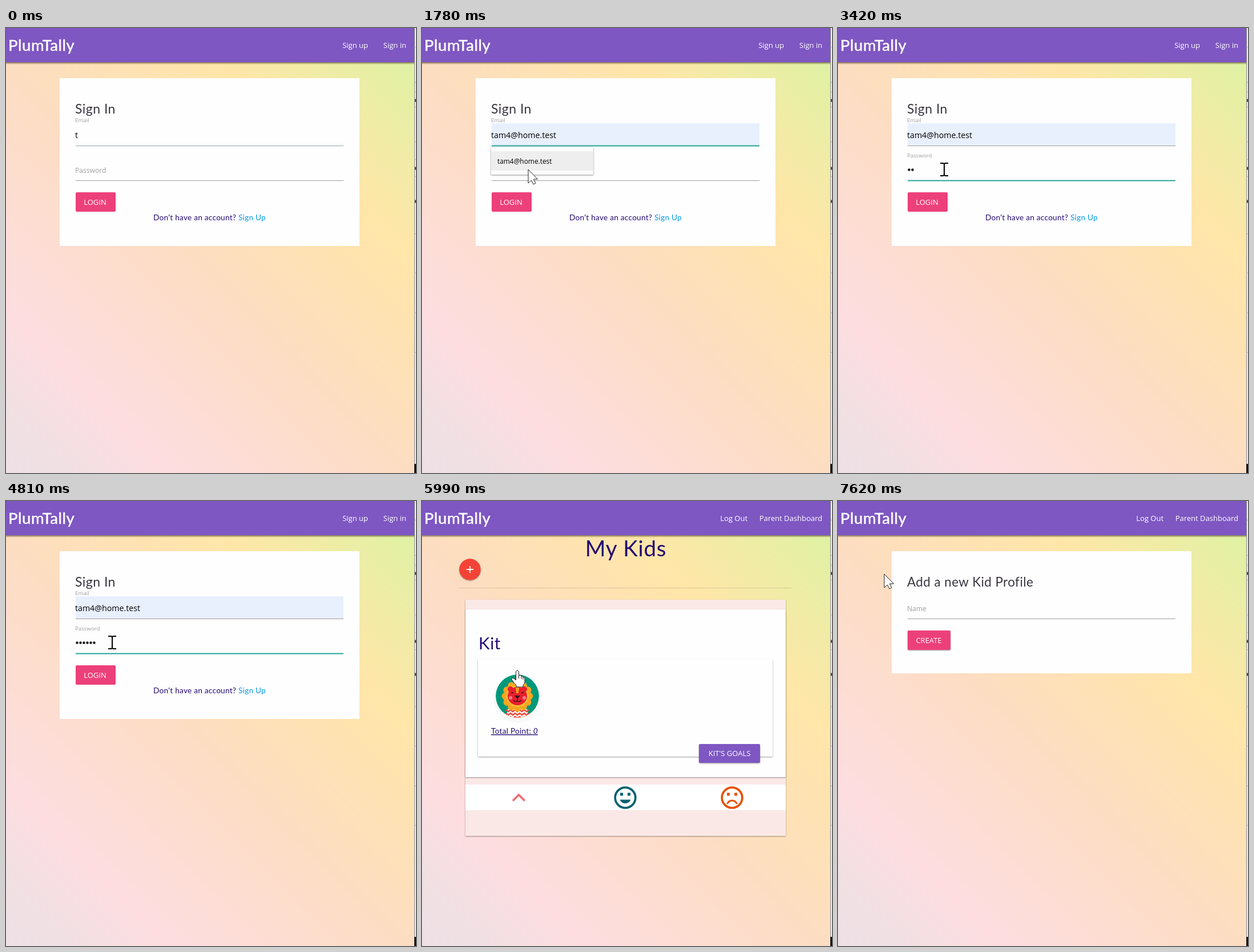
Write an HTML page that moves like this. It is 718x780 px and loops after 8000 ms.

```html
<!DOCTYPE html>
<html lang="en">
<head>
<meta charset="utf-8">
<title>Kid tracker</title>
<style>
  html, body { margin: 0; width: 100%; height: 100%; overflow: hidden; }
  svg { display: block; width: 718px; height: 780px; }
  text { font: 13px "Open Sans", sans-serif; white-space: pre; }
  .hand { font-family: Lato, sans-serif; letter-spacing: .02em; fill: #230a72; }
  .title { font-size: 23px; fill: #3a3640; }
  .white { fill: #fff; }
  .label { font-size: 12.1px; fill: #9e9e9e; }
  .mid { text-anchor: middle; }
  .end { text-anchor: end; }
  .shade { filter: drop-shadow(0 1.5px 1.3px #0006); }
  .icon { fill: none; stroke-width: 3.7; }
</style>
</head>
<body>
<svg viewBox="0 0 718 780">
  <defs>
    <linearGradient id="sky" gradientUnits="userSpaceOnUse" x1="-16" y1="764" x2="732" y2="16">
      <stop offset="0" stop-color="#eee1e6"/>
      <stop offset=".07" stop-color="#f0e0e4"/>
      <stop offset=".19" stop-color="#fddde0"/>
      <stop offset=".47" stop-color="#fdddc2"/>
      <stop offset=".73" stop-color="#ffe6a8"/>
      <stop offset=".96" stop-color="#dff2a4"/>
    </linearGradient>
    <linearGradient id="drop" x2="0" y2="1">
      <stop stop-color="#4a3a1c" stop-opacity=".65"/>
      <stop offset="1" stop-color="#4a3a1c" stop-opacity="0"/>
    </linearGradient>
    <clipPath id="round"><circle cx="167" cy="342" r="38"/></clipPath>
  </defs>

  <rect width="718" height="780" fill="url(#sky)"/>
  <rect y="60" width="715" height="4" fill="url(#drop)"/>
  <rect width="715" height="60" fill="#7e57c2"/>
  <text class="hand" x="4" y="40" style="font-size:27.5px;fill:#fff;stroke:#fff;stroke-width:.5">PlumTally</text>
  <g id="guestNav">
    <text class="white end" x="634" y="35">Sign up</text>
    <text class="white end" x="701" y="35">Sign in</text>
  </g>
  <g id="userNav">
    <text class="white end" x="570" y="35">Log Out</text>
    <text class="white end" x="701" y="35">Parent Dashboard</text>
  </g>

  <g id="signIn">
    <rect x="94" y="88" width="525" height="294" fill="#fefefe"/>
    <text class="hand title" x="121" y="150">Sign In</text>
    <text class="label" x="121" y="165" style="font-size:9.7px">Email</text>
    <rect id="filled" x="122" y="167" width="469" height="39" fill="#e8f0fe"/>
    <text id="email" x="121" y="193" style="font-size:14.2px"></text>
    <rect id="emailLine" x="122" width="469"/>
    <text id="passLabel" class="label" x="121">Password</text>
    <rect id="caret" x="122" y="238" width="1" height="19"/>
    <g id="dots"></g>
    <rect id="passLine" x="122" width="469"/>
    <rect x="122" y="288" width="70" height="34" rx="2" fill="#ec407a"/>
    <text class="white mid" x="156" y="310">LOGIN</text>
    <text class="hand mid" x="356.5" y="337" style="font-size:13.6px">Don't have an account? <tspan fill="#039be5">Sign Up</tspan></text>
    <g id="suggest">
      <rect class="shade" x="121" y="209" width="179" height="48" rx="2" fill="#fff" stroke="#ddd" stroke-width=".6"/>
      <rect id="hover" x="121" y="216" width="179" height="34" fill="#eee"/>
      <text x="132" y="238" style="font-size:11.9px">tam4@home.test</text>
    </g>
  </g>

  <g id="kids">
    <text class="hand mid" x="357" y="97" style="font-size:38.5px">My Kids</text>
    <path d="M65 152.5H647" stroke="#0002"/>
    <circle class="shade" cx="84" cy="120" r="18.7" fill="#f44336"/>
    <path d="M78 120H90M84 114V126" stroke="#fff" stroke-width="1.8"/>
    <rect class="shade" x="76" y="173" width="561" height="414" rx="1" fill="#fae8e6"/>
    <rect class="shade" x="76" y="190" width="561" height="294" rx="1" fill="#fefefe"/>
    <text class="hand" x="99" y="260" style="font-size:29.5px">Kit</text>
    <rect class="shade" x="98" y="277" width="516" height="171" rx="1" fill="#fefefe"/>
    <circle cx="168" cy="346" r="43" fill="#f9f9f9"/>
    <g clip-path="url(#round)">
      <circle cx="167" cy="342" r="38" fill="#009879"/>
      <path d="M149 382V366Q167 354 185 366V382Z" fill="#fff"/>
      <path id="stripes" fill="none" stroke="#f04a3a" stroke-width="2.6"/>
      <g id="mane"></g>
      <g fill="#e8202e">
        <circle cx="155" cy="330" r="5"/><circle cx="179" cy="330" r="5"/>
        <ellipse cx="167" cy="342" rx="17" ry="16"/>
      </g>
      <path d="M164 327H170L169 337H165Z" fill="#f89a1c"/>
      <path d="M162 341H172L167 347Z M156 337a2 2 0 1 1 4 0z M174 337a2 2 0 1 1 4 0z" fill="#3b1420"/>
      <path d="M167 346V350M160 349Q164 354 167 350Q170 354 174 349" fill="none" stroke="#3b1420" stroke-width="1.3"/>
      <g fill="#f97d8a"><circle cx="155" cy="345" r="3"/><circle cx="179" cy="345" r="3"/></g>
    </g>
    <text id="points" class="hand" x="121" y="408" style="font-size:13.6px">Total Point: <tspan font-style="italic">0</tspan></text>
    <rect class="shade" x="485" y="426" width="107" height="33" rx="2" fill="#7e57c2"/>
    <text class="white mid" x="538.5" y="447">KIT'S GOALS</text>
    <rect x="76" y="497" width="561" height="45" fill="#fff"/>
    <path class="icon" d="M159 525.5L169.5 515L180 525.5" stroke="#ee6e73"/>
    <g class="icon" stroke="#00606f">
      <circle cx="356" cy="520" r="17.8"/>
      <path d="M346.500 523.500H365.500Q363 530 356 530Q349 530 346.500 523.500Z" fill="#00606f" stroke="none"/>
      <path d="M349.500 511.500v5M362.500 511.500v5" stroke-width="5"/>
    </g>
    <g class="icon" stroke="#e65100">
      <circle cx="543" cy="520" r="17.8"/>
      <path d="M534.500 531Q537 525 543 525Q549 525 551.500 531" stroke-width="3"/>
      <path d="M536.500 511.500v5M549.500 511.500v5" stroke-width="5"/>
    </g>
    <rect id="tab" x="76" y="540" width="187" height="2" fill="#f6b2b5"/>
  </g>

  <g id="addKid">
    <rect x="94" y="88" width="525" height="214" fill="#fefefe"/>
    <text class="hand title" x="121" y="150" style="font-size:22.4px">Add a new Kid Profile</text>
    <text class="label" x="121" y="193">Name</text>
    <rect x="122" y="206" width="469" height="1" fill="#9e9e9e"/>
    <rect class="shade" x="122" y="227" width="75" height="34" rx="2" fill="#ec407a"/>
    <text class="white mid" x="159" y="249">CREATE</text>
  </g>

  <!-- sliver of the window behind -->
  <rect x="715" width="3" height="780" fill="#eeeef0"/>
  <rect x="715" width="1" height="780" fill="#8e8a90"/>
  <path d="M716 33.500h2m-2 62h2m-2 17h2m-2 26h2m-2 61h2m-2 31h2m-2 30h2m-2 100h2m-2 69h2m-2 70h2m-2 69h2" stroke="#bbb"/>
  <path d="M716 127h2M716 246h2M716 304h2" stroke="#445" stroke-width="5"/>
  <rect x="715" y="764" width="3" height="16" fill="#111"/>

  <g id="cursor">
    <circle id="click" cx="-2" cy="-1" r="17" fill="#ff0" fill-opacity=".5"/>
    <path id="arrow" d="M0 0V24L5.500 19L9 26L13 24L9.500 17H16.500Z" fill="#fff" stroke="#222"/>
    <path id="beam" d="M-7-11H-2L0-10L2-11H7M0-10V10M-7 11H-2L0 10L2 11H7" fill="none" stroke="#000" stroke-width="2"/>
    <g id="pointer" fill="#fff" stroke="#222" stroke-linejoin="round">
      <path d="M-2.500 2Q0-2 2.500 2V9Q5 7 7 10Q9 9 10 12Q13 11 13 15V20Q13 23 10 26V29H-2V26Q-6 22-10 16Q-10 12-6 14L-2.500 17Z"/>
      <path d="M2.500 9V14M7 10V15M10 12V16"/>
    </g>
  </g>
</svg>
<script>
const $ = id => document.getElementById(id);
const show = (id, on) => $(id).style.display = on ? '' : 'none';
const set = (id, attrs) => { for (const k in attrs) $(id).setAttribute(k, attrs[k]); };
const within = (t, a, b) => t >= a && t < b;

// start, end, hops, then from and to positions
const moves = [
  [70, 210, 2, 522, 704, 160, 354],
  [380, 770, 5, 160, 354, 177, 193],
  [1390, 1540, 2, 177, 193, 186, 248],
  [4810, 5190, 5, 186, 248, 167, 297],
  [6990, 7400, 6, 167, 297, 81, 128]
];
const clicks = [[790, 950], [1790, 1950], [2400, 2560], [5360, 5510], [7500, 7620]];
const shapes = [[0, 'arrow'], [690, 'beam'], [1460, 'arrow'], [2050, 'beam'], [4960, 'arrow'],
  [5100, 'pointer'], [7120, 'arrow'], [7330, 'pointer'], [7620, 'arrow']];
const keys = [3190, 3420, 3660, 3800, 4030, 4260];

const circles = (n, place, r, fill) => Array.from({length: n}, (_, i) => {
  const [x, y] = place(i);
  return `<circle cx="${x}" cy="${y}" r="${r}" fill="${fill}"/>`;
}).join('');
const ring = (n, r) => i => [167 + r * Math.cos(i * 2 * Math.PI / n), 342 + r * Math.sin(i * 2 * Math.PI / n)];

$('mane').innerHTML = circles(12, ring(12, 21), 6.3, '#f9a61f') + circles(12, ring(12, 15), 5, '#fbb934');
$('dots').innerHTML = circles(6, i => [124.500 + i * 6, 248.500], 2.2, '#111');
set('stripes', {d: [366, 372, 378].map(y => `M147 ${y}` + 'l4 3l4-3'.repeat(5)).join('')});

function line(id, y, focused, idle) {
  set(id, {y: focused ? y - .5 : y, height: focused ? 2 : 1, fill: focused ? '#26a69a' : idle});
}

function moveCursor(t) {
  let x, y;
  for (const [a, b, hops, x0, y0, x1, y1] of moves) {
    if (t < a) break;
    const p = Math.min(1, Math.floor((t - a) / (b - a) * hops) / hops);
    x = x0 + (x1 - x0) * p;
    y = y0 + (y1 - y0) * p;
  }
  show('cursor', t >= 70);
  if (t >= 70) set('cursor', {transform: `translate(${x} ${y})`});
  const shape = shapes.filter(s => t >= s[0]).pop()[1];
  for (const id of ['arrow', 'beam', 'pointer']) show(id, id === shape);
  show('click', clicks.some(([a, b]) => within(t, a, b)));
}

function draw(t) {
  const signedIn = t >= 5900, adding = t >= 7620;
  show('guestNav', !signedIn);
  show('userNav', signedIn);
  show('signIn', !signedIn);
  show('kids', signedIn && !adding);
  show('addKid', adding);

  const chosen = t >= 1540;
  show('filled', chosen);
  $('email').textContent = chosen ? 'tam4@home.test' : 't';
  show('suggest', within(t, 950, 2040));
  show('hover', chosen);
  line('emailLine', 206, within(t, 790, 2550), t < 790 ? '#8aa3a5' : '#9e9e9e');
  line('passLine', 267, within(t, 2550, 5360), '#9e9e9e');

  const lift = t < 2400 ? 0 : Math.min(1, .27 + Math.max(0, t - 2470) / 240 * .73);
  set('passLabel', {y: 254 - 27 * lift, style: `font-size:${12.1 - 2.4 * lift}px`});
  show('caret', within(t, 2470, 3020));
  [...$('dots').children].forEach((dot, i) => dot.style.display = t >= keys[i] ? '' : 'none');

  $('points').style.textDecoration = t < 7070 ? 'underline' : 'none';
  show('tab', t >= 6140);
  moveCursor(t);
}

function tick(now) {
  draw(now % 8000);
  requestAnimationFrame(tick);
}
draw(0);
requestAnimationFrame(tick);
</script>
</body>
</html>
```
